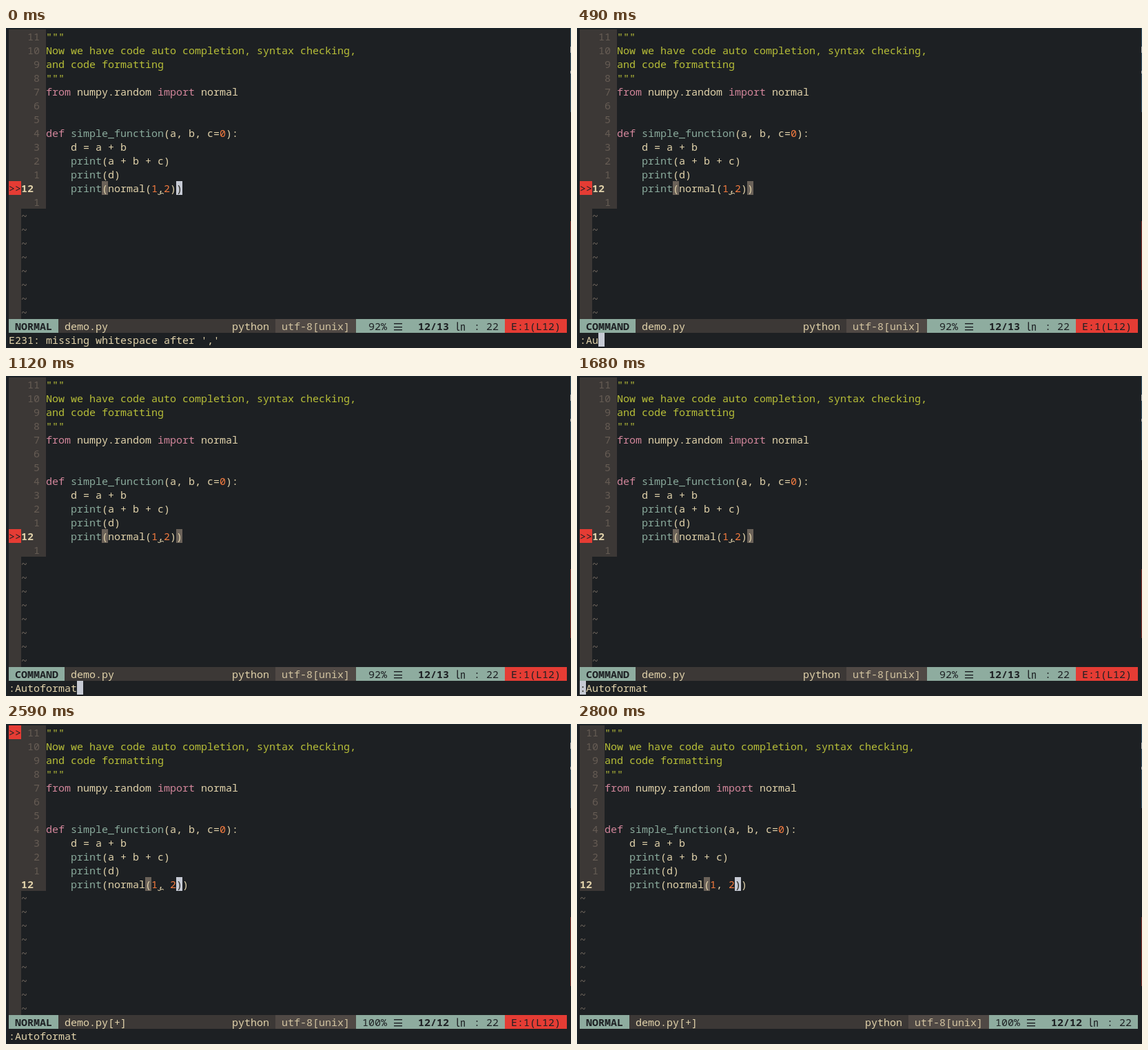
These frames come from a looping animation (820x464 px, 2870 ms). An HTML page with a canvas:

```html
<!DOCTYPE html>
<html lang="en">
<head>
<meta charset="utf-8">
<title>Editor autoformat</title>
<style>
html, body { margin: 0; width: 100%; height: 100%; overflow: hidden; background: #1d2023; }
canvas { display: block; }
</style>
</head>
<body>
<canvas width="820" height="464"></canvas>
<script>
const ctx = document.querySelector('canvas').getContext('2d');
const LOOP = 2870, CELL = 9, LINE = 20, LEFT = 4, TOP = 2, COLS = 90;
const OPEN = 210, TYPE = 350, KEY = 70, ENTER = 1400, FORMAT = 1890, CLEAN = 2730;
const COMMAND = 'Autoformat';
const FONT = '15px "Noto Sans Mono", monospace';
const C = {
  bg: '#1d2023', fg: '#e2d3ab', gutter: '#3c3836', number: '#665c54', mid: '#504945',
  string: '#b8bf38', key: '#d3869b', name: '#8aaa9c', digit: '#f47b3f',
  mode: '#8eac9f', error: '#e53c34', cursor: '#c6cad4', match: '#6b6259', tilde: '#756b61'
};

function fill(col, row, width, color, rows = 1) {
  ctx.fillStyle = color;
  ctx.fillRect(LEFT + col * CELL, TOP + row * LINE, width * CELL, rows * LINE);
}

function write(text, col, row, color = C.fg, bold = false) {
  ctx.font = (bold ? 'bold ' : '') + FONT;
  ctx.fillStyle = color;
  ctx.fillText(text, LEFT + col * CELL, TOP + row * LINE + 16);
}

function writeTokens(tokens, col, row) {
  for (const [text, kind] of tokens) {
    write(text, col, row, C[kind]);
    col += text.length;
  }
}

const code = [
  [['"""', 'string']],
  [['Now we have code auto completion, syntax checking,', 'string']],
  [['and code formatting', 'string']],
  [['"""', 'string']],
  [['from ', 'key'], ['numpy.random ', 'fg'], ['import ', 'key'], ['normal', 'fg']],
  [], [],
  [['def ', 'key'], ['simple_function', 'name'], ['(a, b, c=', 'fg'], ['0', 'digit'], ['):', 'fg']],
  [['    d = a + b', 'fg']],
  [['    print', 'name'], ['(a + b + c)', 'fg']],
  [['    print', 'name'], ['(d)', 'fg']]
];

function callLine(formatted) {
  return [['    print', 'name'], ['(normal(', 'fg'], ['1', 'digit'],
    [formatted ? ', ' : ',', 'fg'], ['2', 'digit'], ['))', 'fg']];
}

function drawEdges() {
  ctx.fillStyle = '#18242d';
  ctx.fillRect(0, 0, 820, 1);
  ctx.fillRect(0, 0, 1, 464);
  for (const [y, h, color] of [[0, 122, '#39576a'], [27, 9, '#b9bec2'], [62, 4, '#b9bec2'], [280, 100, '#86332b']]) {
    ctx.fillStyle = color;
    ctx.fillRect(819, y, 1, h);
  }
}

function drawBuffer(formatted, clean, inCommand) {
  const numbers = clean ? 0 : 2, start = numbers + 4;
  const lines = formatted ? 12 : 13;
  if (!clean) {
    fill(0, 0, 2, C.gutter, 21);
    const sign = formatted ? 0 : 11;
    fill(0, sign, 2, C.error);
    write('>>', 0, sign, C.bg);
  }
  fill(numbers, 0, 4, C.gutter, lines);
  for (let row = 0; row < 21; row++) {
    if (row >= lines) write('~', numbers, row, C.tilde);
    else if (row === 11) write('12', numbers, row, C.fg, true);
    else write(String(Math.abs(11 - row)).padStart(3), numbers, row, C.number);
  }
  code.forEach((tokens, row) => writeTokens(tokens, start, row));

  const cursor = start + 21;
  fill(start + (formatted ? 16 : 9), 11, 1, C.match);
  fill(cursor, 11, 1, inCommand ? C.match : C.cursor);
  writeTokens(callLine(formatted), start, 11);
  if (!inCommand) write(')', cursor, 11, C.bg);
  if (!clean) drawSquiggle(LEFT + (start + 18) * CELL, 240.5);
}

function drawSquiggle(x, y) {
  ctx.strokeStyle = C.fg;
  ctx.lineWidth = 1;
  ctx.beginPath();
  for (let i = 0; i <= CELL; i++) ctx.lineTo(x + i, y + Math.sin(i / CELL * 2 * Math.PI));
  ctx.stroke();
}

function drawStatus(formatted, clean, inCommand) {
  const mode = inCommand ? 'COMMAND' : 'NORMAL', width = mode.length + 2;
  const right = clean ? COLS : COLS - 10;
  fill(0, 21, COLS, C.gutter);
  fill(0, 21, width, C.mode);
  write(mode, 1, 21, C.bg, true);
  write(formatted ? 'demo.py[+]' : 'demo.py', width + 1, 21);
  write('python', right - 44, 21);
  fill(right - 37, 21, 13, C.mid);
  write('utf-8[unix]', right - 36, 21, '#d2c3a0');
  fill(right - 24, 21, 24, C.mode);
  write(formatted ? '100%' : ' 92%', right - 23, 21, C.bg);
  const x = LEFT + (right - 18) * CELL;
  for (const y of [428, 433, 437]) ctx.fillRect(x + 1, y, 12, 1.4);
  write(formatted ? '12/12' : '12/13', right - 14, 21, C.bg, true);
  ctx.font = '15px "Noto Sans CJK JP", "Noto Sans CJK SC", sans-serif';
  ctx.fillText('㏑', LEFT + (right - 8) * CELL, 438);
  write(': 22', right - 5, 21, C.bg);
  if (!clean) {
    fill(right, 21, 10, C.error);
    write('E:1(L12)', right + 1, 21, C.bg);
  }
}

function drawCommand(t, inCommand) {
  if (t >= CLEAN) return;
  if (t < OPEN) return write("E231: missing whitespace after ','", 0, 22);
  const typed = Math.max(0, Math.min(COMMAND.length, Math.floor((t - TYPE) / KEY)));
  const entered = t >= ENTER;
  if (inCommand) fill(entered ? 0 : typed + 1, 22, 1, C.cursor);
  write(':' + COMMAND.slice(0, typed), 0, 22);
  if (inCommand && entered) write(':', 0, 22, C.bg);
}

function draw() {
  const t = performance.now() % LOOP;
  const formatted = t >= FORMAT, clean = t >= CLEAN;
  const inCommand = t >= OPEN && !formatted;
  ctx.fillStyle = C.bg;
  ctx.fillRect(0, 0, 820, 464);
  drawEdges();
  drawBuffer(formatted, clean, inCommand);
  drawStatus(formatted, clean, inCommand);
  drawCommand(t, inCommand);
  requestAnimationFrame(draw);
}
draw();
</script>
</body>
</html>
```
